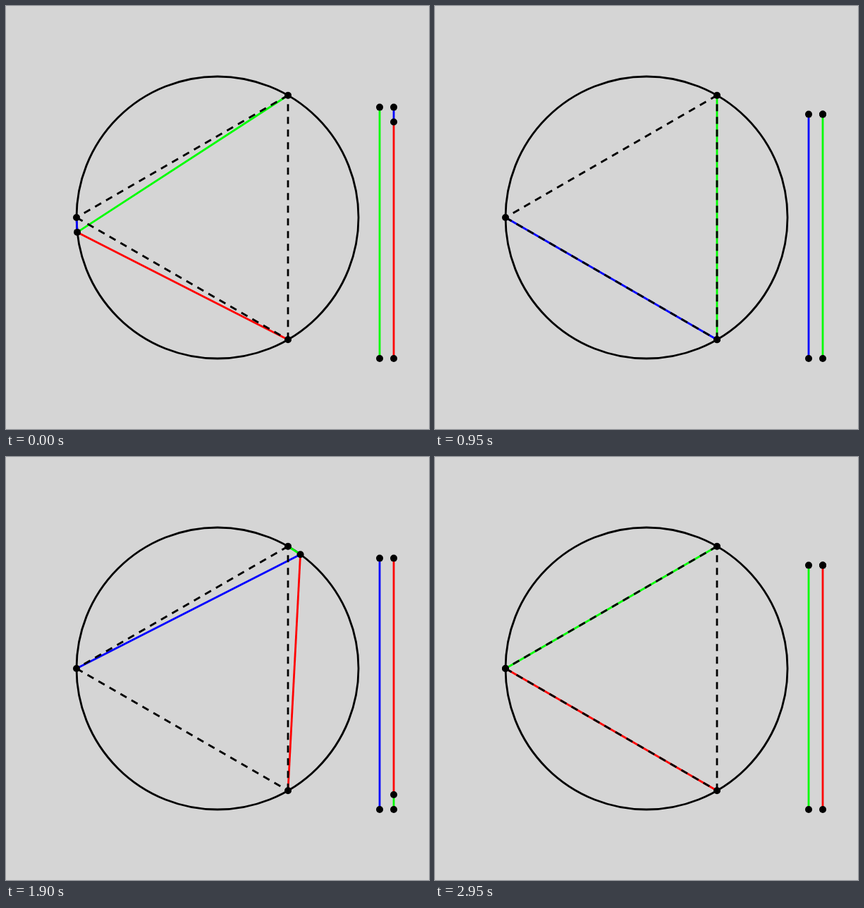
An HTML page with a canvas that plays this animation: 600x600 px, repeating every 3 s.

```html
<!DOCTYPE html>
<html lang="en">
<head>
<meta charset="utf-8">
<title>Chord lengths on a circle</title>
<style>
  html, body { margin: 0; width: 100%; height: 100%; overflow: hidden; background: #d5d5d5; }
  canvas { display: block; }
</style>
</head>
<body>
<canvas id="stage" width="600" height="600"></canvas>
<script>
const ctx = document.getElementById('stage').getContext('2d');
const STEP = 50, STEPS = 60, BASE = 500;
const BLUE = '#00f', RED = '#f00', GREEN = '#0f0';

// Angles run from the leftmost point, through the bottom, to the right.
function onCircle(deg) {
  const a = deg * Math.PI / 180;
  return [300 - 200 * Math.cos(a), 300 + 200 * Math.sin(a)];
}

const corners = [0, 120, 240].map(onCircle);
const colors = [BLUE, RED, GREEN];

function line(p, q, color) {
  ctx.strokeStyle = color;
  ctx.beginPath();
  ctx.moveTo(...p);
  ctx.lineTo(...q);
  ctx.stroke();
}

function dot([x, y]) {
  ctx.beginPath();
  ctx.arc(x, y, 5, 0, 2 * Math.PI);
  ctx.fill();
}

function draw(deg) {
  ctx.fillStyle = '#d5d5d5';
  ctx.fillRect(0, 0, 600, 600);
  ctx.fillStyle = '#000';
  ctx.lineWidth = 2.8;

  ctx.strokeStyle = '#000';
  ctx.beginPath();
  ctx.arc(300, 300, 200, 0, 2 * Math.PI);
  ctx.stroke();

  const point = onCircle(deg);
  corners.forEach((c, i) => line(c, point, colors[i]));

  ctx.setLineDash([10, 8]);
  corners.forEach((c, i) => line(c, corners[(i + 1) % 3], '#000'));
  ctx.setLineDash([]);
  [...corners, point].forEach(dot);

  // The longest chord equals the sum of the other two.
  const arc = Math.floor(deg / 120);
  const upper = arc, lower = (arc + 1) % 3, longest = (arc + 2) % 3;
  const size = i => Math.hypot(point[0] - corners[i][0], point[1] - corners[i][1]);
  const top = BASE - size(longest), middle = BASE - size(lower);
  line([530, BASE], [530, top], colors[longest]);
  line([550, BASE], [550, middle], colors[lower]);
  line([550, middle], [550, top], colors[upper]);
  [[530, BASE], [530, top], [550, BASE], [550, middle], [550, top]].forEach(dot);
}

function tick() {
  const step = Math.floor(performance.now() / STEP);
  draw((step + 1) % STEPS * 360 / STEPS);
  requestAnimationFrame(tick);
}
tick();
</script>
</body>
</html>
```
